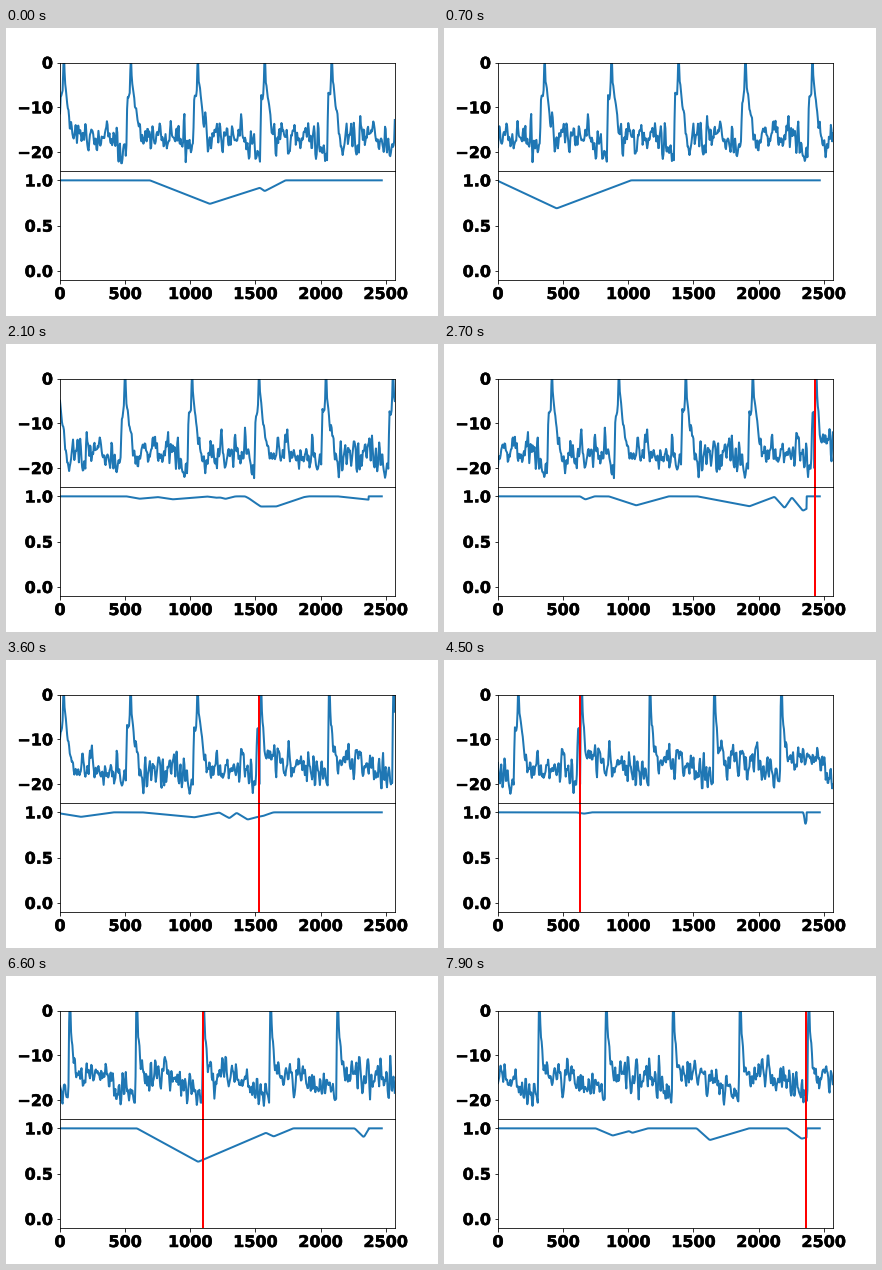
Recreate the animation shown at these times as a matplotlib script. Size 432x288 px, loop 8 s.

```python
import numpy as np
import matplotlib.pyplot as plt
from matplotlib.animation import FuncAnimation
from matplotlib.patheffects import withStroke

FRAMES, STEP, SPAN, DT = 80, 100, 2570, 5
PERIOD = 514
EDGE = 2370          # newest scored sample in the window
BLUE = "#1f77b4"

plt.rcParams.update({"font.family": "DejaVu Sans", "font.size": 16,
                     "font.weight": "bold"})

# ---- level signal, in absolute sample positions ----
rng = np.random.default_rng(11)
marks = 5130 + 2566 * np.arange(3)
peaks = np.concatenate([30 + PERIOD * np.arange(10),
                        5132 + PERIOD * np.arange(11)])
peaks[10:12] = 5140, 5666
peaks[20] = 10284

# (offset from peak, level)
BEAT_A = [(-35, -20), (-27, -8), (-9, -7), (0, 3), (8, -4), (32, -10.5),
          (50, -14), (90, -16), (410, -17.5), (440, -20)]
BEAT_B = [(-35, -19), (-10, -20), (-2, 3), (5, 2), (12, -6), (22, -8),
          (32, -13), (220, -14.5), (470, -18.5)]


def rough(n):
    """Lightly smoothed unit noise."""
    v = np.convolve(rng.normal(size=n + 2), [0.5, 1, 0.5], "valid")
    return v / v.std()


def make_signal(pos):
    k = np.searchsorted(peaks - 35, pos, side="right") - 1
    d = pos - peaks[k]
    base = np.where(pos < marks[0], np.interp(d, *zip(*BEAT_A)),
                    np.interp(d, *zip(*BEAT_B)))
    common = rough(130)[(d + 35) // DT % 130]
    noise = 1.3 * common + 1.4 * rough(len(pos))
    calm = np.interp(d, [-35, -25, 20, 60], [0.8, 0.3, 0.3, 1])
    return np.clip(base + calm * noise, -22.5, 3)


world = np.arange(0, STEP * (FRAMES - 1) + SPAN + DT, DT)
signal = make_signal(world)

# ---- score curve: dips that scroll with the signal and melt together ----
# time step: (centre, depth, width to the left, width to the right)
DIPS = {
    0: [(1150, .26, 460, 560), (1570, .12, 110, 160)],
    7: [(450, .31, 460, 570)],
    10: [(150, .17, 300, 570)],
    14: [(1310, .06, 100, 200), (1565, .075, 150, 280),
         (1900, .035, 80, 160), (2240, .2, 120, 330)],
    27: [(670, .035, 40, 70), (1060, .1, 210, 250), (1930, .11, 400, 200),
         (2200, .13, 80, 60), (2340, .16, 90, 200)],
    45: [(660, .015, 60, 60), (2362, .2, 14, 10)],
    58: [(640, .025, 50, 60), (1080, .05, 70, 90), (1860, .37, 270, 480),
         (2310, .04, 90, 60)],
    66: [(1060, .37, 470, 600), (1640, .09, 130, 150), (2332, .1, 70, 40)],
    79: [(880, .08, 130, 200), (1030, .05, 60, 120), (1625, .13, 100, 300),
         (2330, .115, 110, 300)],
}
KEYS = list(DIPS)
score_x = np.arange(0, 2471, 2)
SOFT = np.ones(9) / 9


def pose(key, i):
    x = score_x + STEP * (i - key)
    depth = np.zeros(len(x))
    for c, h, left, right in DIPS[key]:
        u = 1 - np.abs(x - c) / np.where(x < c, left, right)
        depth = np.maximum(depth, h * np.clip(u, 0, 1))
    depth = np.convolve(np.pad(depth, 4, mode="edge"), SOFT, "valid")
    return np.where(score_x < EDGE, 1 - depth, 1)


def score(i):
    n = max(j for j, k in enumerate(KEYS[:-1]) if k <= i)
    a, b = KEYS[n:n + 2]
    w = (i - a) / (b - a)
    w = w * w * (3 - 2 * w)
    return (1 - w) * pose(a, i) + w * pose(b, i)


# ---- figure ----
fig, (top, low) = plt.subplots(2, 1, sharex=True, figsize=(6, 4), dpi=72)
fig.subplots_adjust(left=0.125, right=0.9, bottom=0.125, top=0.88, hspace=0)
top.set(xlim=(0, SPAN), ylim=(-24.3, 0), yticks=[-20, -10, 0])
low.set(ylim=(-0.1, 1.1), yticks=[0, 0.5, 1], xticks=range(0, 2501, 500))
top.tick_params(axis="x", bottom=False, labelbottom=False)
fig.canvas.draw()
for label in top.get_yticklabels() + low.get_yticklabels() + low.get_xticklabels():
    label.set_path_effects([withStroke(linewidth=0.5, foreground="black")])

win = np.arange(0, SPAN + 1, DT)
wave, = top.plot(win, signal[:len(win)], color=BLUE, lw=2)
curve, = low.plot(score_x, score(0), color=BLUE, lw=2)
bars = [[ax.axvline(0, color="red", lw=2, visible=False) for ax in (top, low)]
        for _ in marks]


def update(i):
    start = i * STEP // DT
    wave.set_ydata(signal[start:start + len(win)])
    curve.set_ydata(score(i))
    for mark, pair in zip(marks, bars):
        x = mark - i * STEP
        for bar in pair:
            bar.set_xdata([x, x])
            bar.set_visible(0 <= x <= SPAN)
    return [wave, curve]


anim = FuncAnimation(fig, update, frames=FRAMES, interval=100, repeat=True,
                     repeat_delay=0)
plt.show()
```
